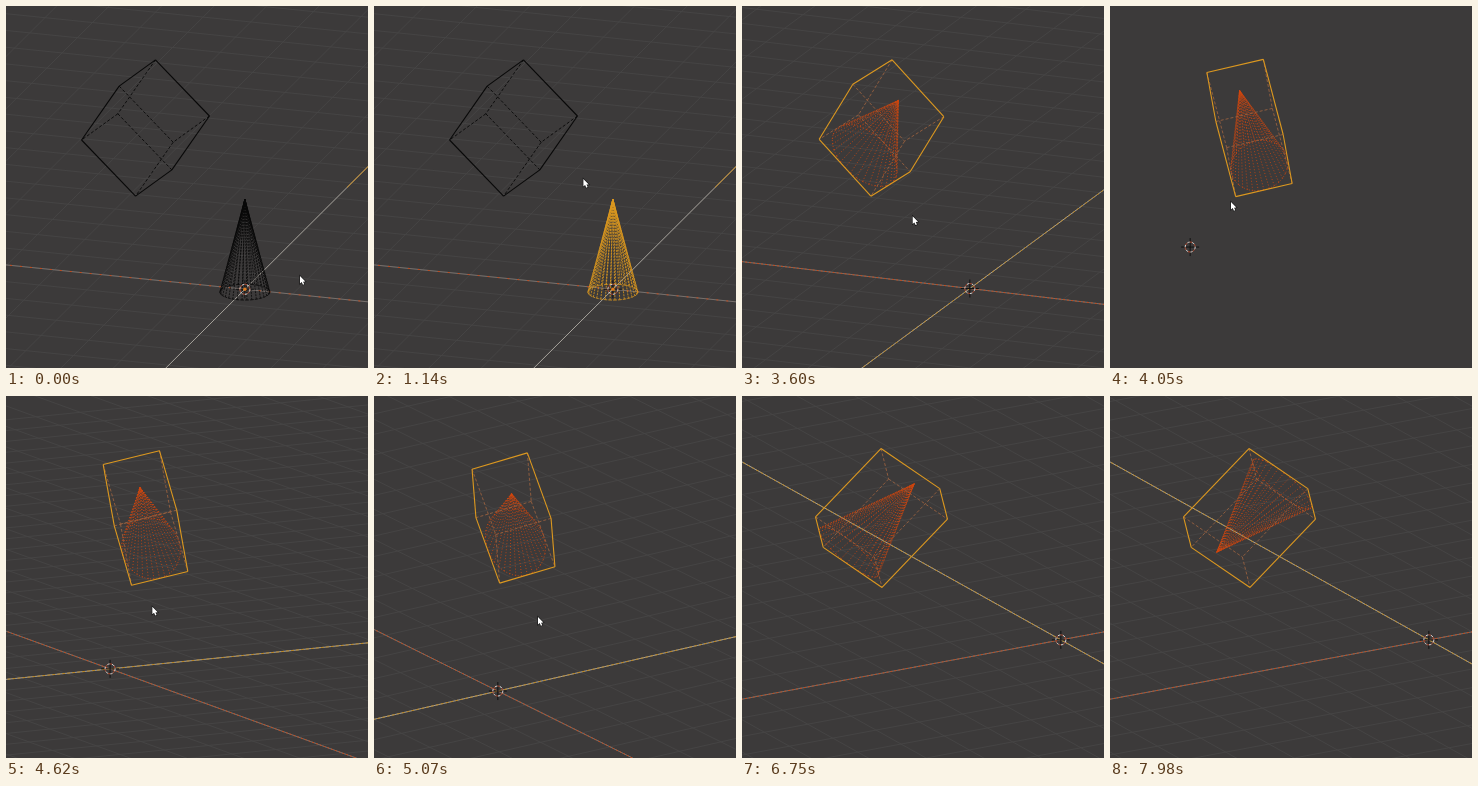
Recreate the animation shown at these times as an HTML page with a canvas. Size 362 px wide and 362 px high, loop 8000 ms.

```html
<!DOCTYPE html>
<html lang="en">
<head>
<meta charset="utf-8">
<style>
  html, body { margin: 0; width: 100%; height: 100%; overflow: hidden; background: #3c3a3a; }
  canvas { display: block; }
</style>
</head>
<body>
<canvas id="stage" width="362" height="362"></canvas>
<script>
const ctx = document.getElementById('stage').getContext('2d');
const LOOP = 8000, SIZE = 362, CELL = 50, RAD = Math.PI / 180;
const ACTIVE = '#dc981f', SELECTED = '#d2470f', IDLE = '#080808';

// Moments of the hard changes, in ms
const PICK_CONE = 750, PICK_BOX = 1400, MENU_OPEN = 1850, ALIGN = 2500, FLIP = 6950;
// The view turns in three drags between these moments
const DRAG = 3450, SIDE_VIEW = 4050, LOW_VIEW = 5070, LAST_VIEW = 5730;

const STOPS = [
  { at: 0, pos: [294, 270] },
  { at: PICK_CONE, pos: [251, 262] },
  { at: PICK_BOX, pos: [187, 125] },
  { at: 2350, pos: [155, 161] },
  { at: ALIGN, pos: [155, 161] },
  { at: DRAG, pos: [180, 213] },
  { at: SIDE_VIEW, pos: [121, 196] },
  { at: LOW_VIEW, pos: [164, 221] },
  { at: LAST_VIEW, pos: [235, 222] },
  { at: 6700, pos: [20, 375] }
];

const clamp = n => Math.min(1, Math.max(0, n));
const ramp = (t, from, to) => clamp((t - from) / (to - from));
const smooth = k => k * k * (3 - 2 * k);
const add = (p, v, k = 1) => p.map((n, i) => n + v[i] * k);
const scale = (v, k) => v.map(n => n * k);
const cross = (p, q) => p[0] * q[1] - p[1] * q[0];

// World space is relative to the centre of the box, which the view turns around
const PIVOT = [139.5, 122];
const ORIGIN = [141, -114.5, -119];
const BOX = tiltedBox([79, 58, 100], 142.5 * RAD, 48.7 * RAD, 20 * RAD);

function tiltedBox([width, depth, height], heading, dip, roll) {
  const [ch, sh, cd, sd, cr, sr] = [heading, dip, roll].flatMap(a => [Math.cos(a), Math.sin(a)]);
  const level = [-sh, ch, 0], rise = [ch * sd, sh * sd, cd];
  return [
    scale(add(scale(level, sr), rise, cr), -width),
    scale(add(scale(level, cr), rise, -sr), depth),
    scale([ch * cd, sh * cd, -sd], height)
  ];
}

const boxPoint = (...k) => BOX.reduce((p, edge, i) => add(p, edge, k[i] - 0.5), [0, 0, 0]);

function cameraAt(t) {
  const first = ramp(t, DRAG, SIDE_VIEW) ** 1.85;
  const second = ramp(t, SIDE_VIEW, LOW_VIEW);
  const third = ramp(t, LOW_VIEW, LAST_VIEW);
  const yaw = (17.75 + 52.25 * first - 14 * second - 86 * third) * RAD;
  const pitch = (18.6 * (1 - first) + 19.7 * second - 0.9 * third) * RAD;
  const c = Math.cos(yaw), s = Math.sin(yaw), tilt = Math.sin(pitch), up = Math.cos(pitch);
  const turn = ([x, y, z]) => [x * c + y * s, tilt * (x * s - y * c) - up * z];
  return { turn, project: p => add(PIVOT, turn(p)), level: tilt < 0.015 };
}

function pointerAt(t) {
  const next = STOPS.findIndex(stop => stop.at > t);
  if (next < 0) return null;
  const from = STOPS[next - 1], to = STOPS[next];
  const k = smooth(ramp(t, from.at, to.at));
  return from.pos.map((n, i) => n + (to.pos[i] - n) * k);
}

function line(p, q, color, width = 1, dash = []) {
  ctx.strokeStyle = color;
  ctx.lineWidth = width;
  ctx.setLineDash(dash);
  ctx.beginPath();
  ctx.moveTo(...p);
  ctx.lineTo(...q);
  ctx.stroke();
  ctx.setLineDash([]);
}

function drawFloor({ project }, turned) {
  const along = (axis, offset, from = -1500, to = 1500) => [from, to].map(reach =>
    project(add(ORIGIN, axis ? [offset, reach, 0] : [reach, offset, 0])));
  for (let i = -24; i <= 24; i++) {
    for (const axis of [0, 1]) line(...along(axis, i * CELL), '#474646', 0.9);
  }
  line(...along(0, 0), '#77706c');
  line(...along(0, 0), '#c04a1c', 1, turned ? [2, 2] : [2, 8]);
  line(...along(1, 0), '#a5a19a');
  if (turned) line(...along(1, 0), '#b98522', 1, [3, 2]);
  else line(...along(1, 0, 335, 600), '#c98a1c');
}

function drawBox({ turn, project }, active) {
  const flat = BOX.map(turn);
  const facing = [0, 1, 2].map(i => cross(flat[(i + 1) % 3], flat[(i + 2) % 3]));
  const inner = [], outer = [];
  for (let i = 0; i < 3; i++) {
    const j = (i + 1) % 3, k = (i + 2) % 3;
    for (const u of [0, 1]) for (const v of [0, 1]) {
      const at = [0, 0, 0];
      at[j] = u;
      at[k] = v;
      const start = boxPoint(...at);
      const outline = facing[j] * (2 * u - 1) * facing[k] * (2 * v - 1) <= 0;
      (outline ? outer : inner).push([project(start), project(add(start, BOX[i]))]);
    }
  }
  inner.forEach(ends => line(...ends, active ? '#98603f' : IDLE, 0.9, [3, 2]));
  outer.forEach(ends => line(...ends, active ? ACTIVE : IDLE, 1.1));
}

function drawCone({ project }, center, u, v, apex, color, dash) {
  const SIDES = 32;
  const tip = project(apex);
  const rim = Array.from({ length: SIDES }, (_, i) => {
    const a = i / SIDES * 2 * Math.PI;
    return project(add(add(center, u, Math.cos(a)), v, Math.sin(a)));
  });
  rim.forEach((p, i) => {
    line(p, tip, color, 0.8, dash);
    line(p, rim[(i + 1) % SIDES], color, 0.8, dash);
  });
}

function drawOriginMark([x, y], dot) {
  line([x - 9, y], [x + 9, y], '#111');
  line([x, y - 9], [x, y + 9], '#111');
  ['#ddd', '#b3482c'].forEach((color, i) => {
    ctx.strokeStyle = color;
    ctx.lineDashOffset = i * 2.5;
    ctx.setLineDash([2.5, 2.5]);
    ctx.beginPath();
    ctx.arc(x, y, 5, 0, 7);
    ctx.stroke();
  });
  ctx.setLineDash([]);
  ctx.lineDashOffset = 0;
  if (!dot) return;
  ctx.fillStyle = '#e07a1c';
  ctx.beginPath();
  ctx.arc(x, y, 1.7, 0, 7);
  ctx.fill();
}

function drawMenu(pointerY) {
  const left = 67, top = 130, width = 116, row = 10;
  ctx.fillStyle = '#191919';
  ctx.fillRect(left, top, width, 60);
  ctx.font = '5.3px "Noto Sans", sans-serif';
  ctx.textBaseline = 'middle';
  ctx.fillStyle = '#c4c4c4';
  ctx.fillText('Quick Favorites', left + 4, top + 8);
  const items = ['Perspective/Orthographic', 'Align Bounds', 'Set Parent Advanced', 'Replace By Primitive'];
  items.forEach((label, i) => {
    const y = top + 22.5 + i * row;
    if (Math.abs(pointerY - y) < row / 2) {
      ctx.fillStyle = '#7d7d7d';
      ctx.fillRect(left + 1, y - row / 2, width - 2, row);
    }
    ctx.fillStyle = '#f0f0f0';
    ctx.fillText(label, left + 15, y);
  });
  ctx.fillStyle = '#858585';
  ctx.fillText('Numpad 5', left + 87, top + 22.5);
}

function drawPointer([x, y]) {
  const arrow = new Path2D('M0 0V7.6L1.7 6.1 2.9 8.8 4.3 8.2 3.1 5.7 5.4 5.5Z');
  ctx.save();
  ctx.translate(x, y);
  ctx.strokeStyle = '#161616';
  ctx.lineWidth = 1.2;
  ctx.stroke(arrow);
  ctx.fillStyle = '#fff';
  ctx.fill(arrow);
  ctx.restore();
}

function draw(t) {
  const camera = cameraAt(t), pointer = pointerAt(t);
  const aligned = t >= ALIGN;
  ctx.fillStyle = '#3c3a3a';
  ctx.fillRect(0, 0, SIZE, SIZE);
  if (!camera.level) drawFloor(camera, t > DRAG);

  if (aligned) {
    const base = t < FLIP ? 1 : 0;
    const [u, v] = BOX.map(edge => scale(edge, 0.5));
    drawCone(camera, boxPoint(0.5, 0.5, base), u, v, boxPoint(0.5, 0.5, 1 - base), SELECTED, [1, 2]);
  } else {
    const color = t < PICK_CONE ? IDLE : t < PICK_BOX ? ACTIVE : SELECTED;
    drawCone(camera, add(ORIGIN, [0, 0, -3]), [25, 0, 0], [0, 25, 0], add(ORIGIN, [0, 0, 95]), color, [2, 1]);
  }
  drawBox(camera, t >= PICK_BOX);
  drawOriginMark(camera.project(ORIGIN), !aligned);
  if (t >= MENU_OPEN && !aligned) drawMenu(pointer[1]);
  if (pointer) drawPointer(pointer);
}

function frame() {
  draw(performance.now() % LOOP);
  requestAnimationFrame(frame);
}
frame();
</script>
</body>
</html>
```
